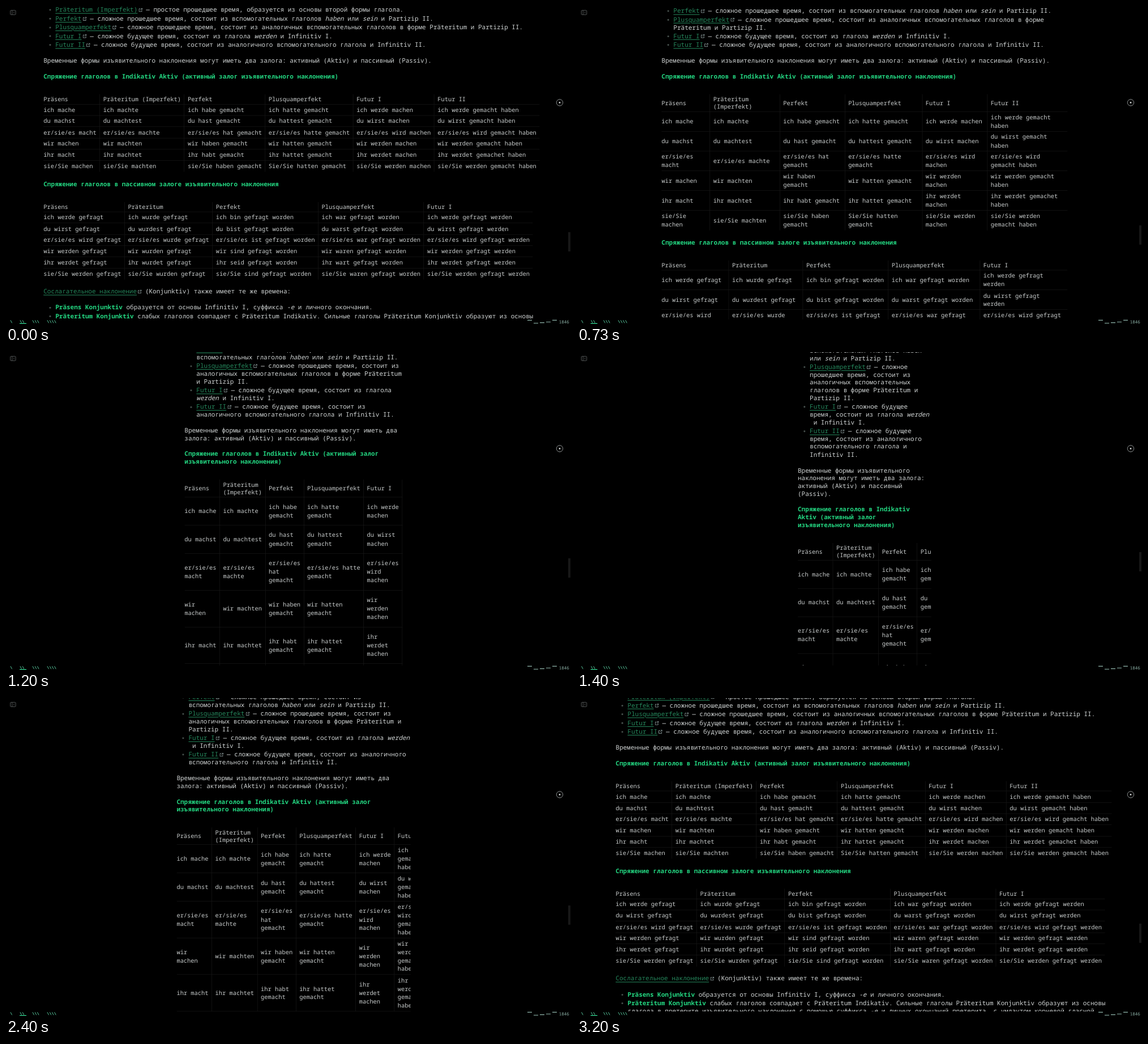
These frames come from a looping animation (998x561 px, 3.27 s). An HTML page:

```html
<!DOCTYPE html>
<html lang="ru">
<head>
<meta charset="utf-8">
<style>
html, body { margin: 0; width: 100%; height: 100%; overflow: hidden; background: #000; }
body { position: relative; font-family: "Noto Sans Mono", "DejaVu Sans Mono", monospace; text-rendering: geometricPrecision; }
#view { position: absolute; left: 0; top: 0; width: 998px; height: 553px; overflow: hidden; }
/* The page is laid out on a 1920 wide screen and scaled to the stage. */
#page { position: absolute; left: 0; top: 0; width: 1920px; height: 1080px; transform: scale(.5198); transform-origin: 0 0;
  font-size: 21.15px; line-height: 26.45px; color: #d2d6d6; }
#above, #below { position: absolute; }
p, ul, h3 { margin: 0; padding: 0; }
ul { list-style: none; padding-left: 40.5px; }
li { position: relative; padding: 1.6px 0; }
li::before { content: ""; position: absolute; left: -21px; top: 12px; width: 6px; height: 6px; border-radius: 50%; background: #46504c; }
ul + p { margin-top: 26px; }
p + ul { margin-top: 26px; }
h3 { margin-top: 26.45px; font-size: inherit; font-weight: 600; color: #23d681; }
.wrap { margin: 47.2px 0 27.5px; overflow: hidden; }
.wrap + h3 { margin-top: 0; }
strong { font-weight: 700; color: #23d681; }
em { font-style: italic; }
.gap { white-space: break-spaces; }
.nb { white-space: nowrap; }
a { position: relative; padding-right: 16px; color: #25875c; text-decoration: underline; text-decoration-thickness: 1.5px; text-underline-offset: 4px; }
a svg { position: absolute; margin: 7px 0 0 4px; width: 13px; height: 13px; fill: none; stroke: #9aa; stroke-width: 1.7; }
table { border-spacing: 0; font-size: 20px; color: #c8cccc; }
th, td { padding: 4.25px 11px; text-align: left; vertical-align: middle; font-weight: 400; line-height: 28.8px;
  border-right: 1px solid #202020; border-bottom: 1px solid #202020; }
th { line-height: 25px; }
th:first-child, td:first-child { padding-left: 0; }
th:last-child, td:last-child { border-right: 0; }
tr:last-child td { border-bottom-color: transparent; }
#thumb { position: absolute; left: 993px; width: 4px; height: 34px; background: #171717; }
#ui { position: absolute; left: 0; top: 0; }
</style>
</head>
<body>
<div id="view"><div id="page"><div id="above"></div><div id="below"></div></div></div>
<div id="thumb"></div>
<svg id="ui" width="998" height="561" fill="none">
  <g stroke="#5c6060">
    <rect x="7.7" y="7.7" width="9.4" height="7.6" rx="1.2" stroke-width=".9"/>
    <path d="M10.8 8v7M14.8 10l-1.5 1.5 1.5 1.5" stroke-width=".8"/>
  </g>
  <circle cx="978" cy="170.4" r="5.7" stroke="#8d9191" stroke-width="1"/>
  <circle cx="978" cy="170.4" r="1.4" fill="#d5d8d8"/>
  <path id="tags" stroke="#55c49a" stroke-width="1"/>
  <path d="M24 560.3h12" stroke="#2fd08c" stroke-width="1.3"/>
  <path d="M921 554.3h8M932 559.5h8M943 558.7h8M954 557.5h8M965 554.3h8" stroke="#8fb5aa" stroke-width="1.2"/>
  <text x="976.8" y="559.6" font-size="7.5" fill="#8fb5aa">1846</text>
</svg>
<script>
const SCALE = .5198, CENTER = 508, LOOP = 3270;
const $ = id => document.getElementById(id);

const icon = '<svg viewBox="0 0 13 13"><path d="M5.5 2.5H1V12h9.500V7.500M7.500 1H12V5.500M12 1L6 7"/></svg>';
const link = s => `<a>${s}${icon}</a>`;
// The space after an italic word may open the next line.
const em = s => `<em>${s}</em><wbr><span class="gap"> </span>`;
const list = items => `<ul>${items.map(s => `<li>${s}</li>`).join('')}</ul>`;
const cell = (tag, s) => `<${tag}>${s.replace(/\S+\/\S+/g, '<span class="nb">$&</span>')}</${tag}>`;
const row = (tag, cells) => `<tr>${cells.map(s => cell(tag, s)).join('')}</tr>`;

const people = ['ich', 'du', 'er/sie/es', 'wir', 'ihr', 'sie/Sie'];
const forms = s => s.split(' ');
const haben = forms('habe hast hat haben habt haben');
const hatte = forms('hatte hattest hatte hatten hattet hatten');
const werde = forms('werde wirst wird werden werdet werden');
const wurde = forms('wurde wurdest wurde wurden wurdet wurden');
const sein = forms('bin bist ist sind seid sind');
const war = forms('war warst war waren wart waren');

const table = (heads, columns) => '<div class="wrap"><table>' + row('th', heads) +
  people.map((who, i) => row('td', columns.map(([verbs, tail]) =>
    `${verbs === hatte && i === 5 ? 'Sie/Sie' : who} ${verbs[i]}${tail(i)}`))).join('') + '</table></div>';
const end = s => () => s && ' ' + s;

const active = table(
  ['Präsens', 'Präteritum (Imperfekt)', 'Perfekt', 'Plusquamperfekt', 'Futur I', 'Futur II'],
  [[forms('mache machst macht machen macht machen'), end('')],
   [forms('machte machtest machte machten machtet machten'), end('')],
   [haben, end('gemacht')], [hatte, end('gemacht')], [werde, end('machen')],
   [werde, i => i === 4 ? ' gemachet haben' : ' gemacht haben']]);
const passive = table(
  ['Präsens', 'Präteritum', 'Perfekt', 'Plusquamperfekt', 'Futur I'],
  [[werde, end('gefragt')], [wurde, end('gefragt')], [sein, end('gefragt worden')],
   [war, end('gefragt worden')], [werde, end('gefragt werden')]]);

$('above').innerHTML = list([
  link('Präteritum (Imperfekt)') + ' — простое прошедшее время, образуется из основы второй формы глагола.',
  link('Perfekt') + ` — сложное прошедшее время, состоит из вспомогательных глаголов ${em('haben')}или ${em('sein')}и Partizip II.`
]);
$('below').innerHTML = list([
  link('Plusquamperfekt') + ' — сложное прошедшее время, состоит из аналогичных вспомогательных глаголов в форме Präteritum и Partizip II.',
  link('Futur I') + ` — сложное будущее время, состоит из глагола ${em('werden')}и Infinitiv I.`,
  link('Futur II') + ' — сложное будущее время, состоит из аналогичного вспомогательного глагола и Infinitiv II.'
]) +
  '<p>Временные формы изъявительного наклонения могут иметь два залога: активный (Aktiv) и пассивный (Passiv).</p>' +
  '<h3>Спряжение глаголов в Indikativ Aktiv (активный залог изъявительного наклонения)</h3>' + active +
  '<h3>Спряжение глаголов в пассивном залоге изъявительного наклонения</h3>' + passive +
  `<p>${link('Сослагательное наклонение')} (Konjunktiv) также имеет те же времена:</p>` +
  list([
    `<strong>Präsens Konjunktiv</strong> образуется от основы Infinitiv I, суффикса ${em('-e')}и личного окончания.`,
    `<strong>Präteritum Konjunktiv</strong> слабых глаголов совпадает с Präteritum Indikativ. Сильные глаголы Präteritum Konjunktiv образуют из основы глагола в претерите изъявительного наклонения с помощью суффикса ${em('-e')}и личных окончаний претерита, с умлаутом корневой гласной.`
  ]);

// Four groups of slanted strokes mark the workspaces.
$('tags').setAttribute('d', [8, 25, 47, 73].map((x, n) =>
  Array.from({ length: n + 1 }, (_, i) => `M${x + i * 4.2} 554.3l2.600 5`).join('')).join(''));

// time, left edge of the column, top of the anchored list item
const steps = [
  [0, 66.2, 30],
  [530, 76, 30], [600, 97, 16.4], [670, 123, 16.4], [730, 149.3, 16.4],
  [800, 185, 16.5], [870, 221, 16.6], [930, 257, 16.7], [1000, 290, 16.8],
  [1200, 315.3, 17.1], [1270, 345, 17.7], [1330, 370, 18.3], [1400, 390, 18.7],
  [1930, 387, 18.8], [2000, 380, 19], [2070, 372, 19.2], [2130, 362, 19.5],
  [2200, 348, 19.7], [2270, 333, 19.8], [2330, 317, 20], [2400, 301.4, 20.1],
  [2470, 286, 20.2], [2530, 265, 20.3], [2600, 243, 20.4], [2670, 223, 20.5], [2730, 204.4, 20.6],
  [3000, 177, 20.7], [3070, 139, 20.8], [3130, 101, 20.9], [3200, 68.3, 21]
];

const above = $('above').style, below = $('below').style, thumb = $('thumb').style;
let shown = null;

function pose([, left, top]) {
  above.left = below.left = left / SCALE + 'px';
  above.width = below.width = 2 * (CENTER - left) / SCALE + 'px';
  above.bottom = 1080 - top / SCALE + 'px';
  below.top = top / SCALE + 'px';
  thumb.top = 408 - .14 * left + 'px';
}

const start = performance.now();
function tick() {
  const t = (performance.now() - start) % LOOP;
  const step = steps.findLast(s => s[0] <= t);
  if (step !== shown) pose(shown = step);
  requestAnimationFrame(tick);
}
tick();
</script>
</body>
</html>
```
